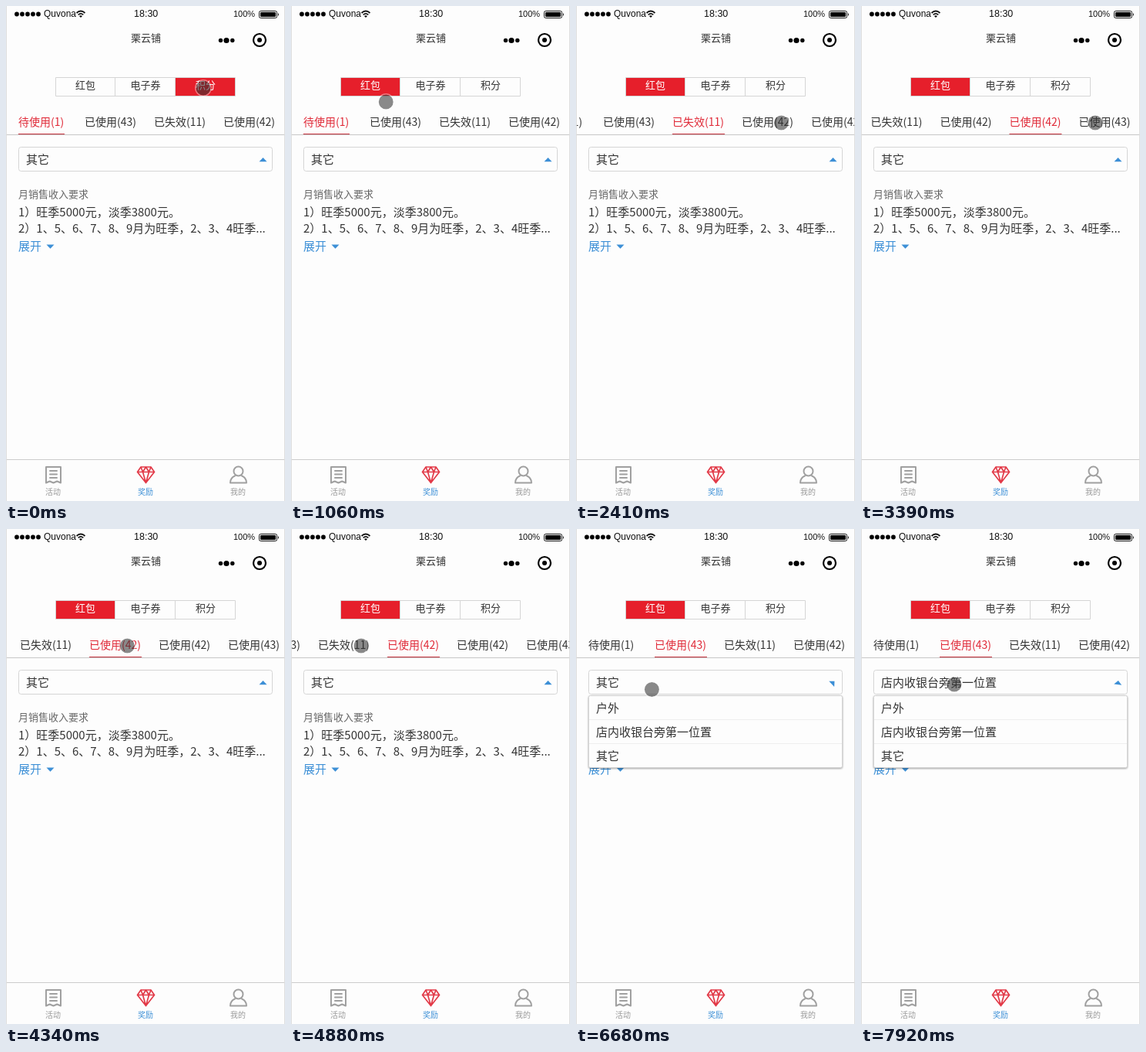
Animation, 362 px wide and 640 px high, one loop 8 s. Source, as an HTML page:

```html
<!DOCTYPE html>
<html lang="zh-CN">
<head>
<meta charset="utf-8">
<title>奖励</title>
<style>
  html, body { margin: 0; width: 100%; height: 100%; overflow: hidden; background: #fdfdfd; }
  svg { display: block; width: 362px; height: 640px; }
  text { font: 15px "Noto Sans CJK SC", "Noto Sans CJK", sans-serif; fill: #333; }
  .status text { font: 12px "Liberation Sans", Arial, sans-serif; fill: #111; }
  .small text, text.small { font-size: 13px; text-anchor: middle; }
  .tabs text { font-size: 14px; }
  .nav text { font-size: 10px; text-anchor: middle; fill: #999; }
  .line { fill: none; stroke: #d5d5d5; }
  .icon { fill: none; stroke: #a0a0a0; stroke-width: 2; stroke-linejoin: round; stroke-linecap: round; }
  .blue, .nav .blue { fill: #3c8fd6; }
  .panel { fill: #fdfdfd; stroke: #d0d0d0; filter: drop-shadow(0 1px 1px rgba(0, 0, 0, .35)); }
</style>
</head>
<body>
<svg viewBox="0 0 362 640">
  <rect width="362" height="640" fill="#fdfdfd"/>

  <g class="status">
    <g id="signal"></g>
    <text x="49" y="14">Quvona</text>
    <path d="M91.5 9Q97 4 102.5 9M93.7 11.4Q97 8.4 100.3 11.4" fill="none" stroke="#111" stroke-width="1.7"/>
    <path d="M95 13Q97 11.3 99 13L97 15Z"/>
    <text x="166" y="14" style="font-size:12.5px">18:30</text>
    <text x="295" y="14" style="font-size:11px">100%</text>
    <rect x="328.5" y="6.5" width="23" height="9" rx="2" fill="none" stroke="#111"/>
    <rect x="330" y="8" width="20" height="6" rx="1"/>
    <path d="M353 9q2 2 0 4z"/>
  </g>

  <text class="small" x="181.5" y="46">栗云铺</text>
  <circle cx="278.5" cy="44.5" r="2.7"/>
  <circle cx="286" cy="44.5" r="3.6"/>
  <circle cx="293.8" cy="44.5" r="2.7"/>
  <circle cx="329" cy="44" r="8" fill="none" stroke="#000" stroke-width="2.2"/>
  <circle cx="329" cy="44" r="3"/>

  <g class="small">
    <rect id="segment" y="93" width="77" height="23" fill="#e61f2b"/>
    <path class="line" d="M64.5 92.5H297.5V116.5H64.5ZM141.5 92V117M219.5 92V117"/>
    <g id="segments"></g>
  </g>

  <clipPath id="strip"><rect x="1" y="130" width="360" height="40"/></clipPath>
  <path class="line" d="M0 166.5H362" style="stroke:#c8c8c8"/>
  <g class="tabs" clip-path="url(#strip)"><g id="tabs">
    <rect id="underline" y="165" height="1" fill="#c4303c"/>
  </g></g>

  <rect class="line" x="16.5" y="182.5" width="329" height="31" rx="3"/>
  <text id="value" x="26" y="204"></text>
  <path id="arrow" class="blue" d="M-5 2.5H5L0-2.7Z"/>

  <text class="small" x="16" y="248" style="text-anchor:start;fill:#666">月销售收入要求</text>
  <text x="16" y="272">1）旺季5000元，淡季3800元。</text>
  <text x="16" y="293">2）1、5、6、7、8、9月为旺季，2、3、4旺季...</text>
  <text class="blue" x="16" y="316">展开</text>
  <path class="blue" d="M52.5 308.5H62.5L57.5 313.7Z"/>

  <g id="menu">
    <rect class="panel" x="16.5" y="215.5" width="329" height="93" rx="2"/>
    <path class="line" d="M17 246.5H345M17 277.5H345" style="stroke:#eee"/>
  </g>

  <g class="nav">
    <path class="line" d="M0 586.5H362" style="stroke:#ccc"/>
    <path class="icon" d="M52 596H71V616.5L66.3 614.5L61.5 616.5L56.7 614.5L52 616.5ZM57 601H66M57 605.5H66M57 610H66"/>
    <path class="icon" style="stroke:#e23a48;stroke-width:1.7" d="M175 596H188L192.5 602.5L181.5 616.5L170.5 602.5ZM170.5 602.5H192.5M177.5 602.5L181.5 616.5L185.5 602.5M175 596L177.5 602.5L181.5 596L185.5 602.5L188 596"/>
    <circle class="icon" cx="301.5" cy="601.5" r="6"/>
    <path class="icon" d="M297 607.5Q291 610 291 616.5H312Q312 610 306 607.5"/>
    <text x="61" y="632">活动</text>
    <text class="blue" x="181" y="632">奖励</text>
    <text x="301" y="632">我的</text>
  </g>

  <path class="line" d="M.5 0V640M361.5 0V640" style="stroke:#dedede"/>
  <g id="cursor">
    <circle r="9.5" fill="#323232" fill-opacity=".57"/>
    <circle r="10.2" fill="none" stroke="#fff" stroke-opacity=".4" stroke-width="1.5"/>
  </g>
</svg>
<script>
const LOOP = 8000, HOLD = 137, EASE_MS = 300;
const $ = id => document.getElementById(id);
const clamp = (v, lo, hi) => Math.min(hi, Math.max(lo, v));
const mix = (a, b, k) => a + (b - a) * k;
const smooth = k => k * k * (3 - 2 * k);
const easeOut = k => 1 - (1 - k) ** 3;

function add(parent, name, attrs, text = '') {
  const el = document.createElementNS('http://www.w3.org/2000/svg', name);
  for (const key in attrs) el.setAttribute(key, attrs[key]);
  el.textContent = text;
  return parent.appendChild(el);
}

for (let i = 0; i < 5; i++) add($('signal'), 'circle', { cx: 14 + i * 7, cy: 10.5, r: 2.9 });

const segments = ['红包', '电子券', '积分'].map((label, i) =>
  add($('segments'), 'text', { x: 103 + i * 78, y: 107 }, label));

const tabLeft = i => i ? 12 + i * 90 : 16;
const scrollFor = i => clamp(tabLeft(i) - 125, 0, 180);
const tabs = ['待使用(1)', '已使用(43)', '已失效(11)', '已使用(42)', '已使用(42)', '已使用(43)']
  .map((label, i) => add($('tabs'), 'text', { x: tabLeft(i), y: 155 }, label));

const options = ['户外', '店内收银台旁第一位置', '其它'];
options.forEach((label, i) => add($('menu'), 'text', { x: 26, y: 237 + i * 31 }, label));

// The finger: three segments leftwards, the tabs up to the last and back, then the menu.
const taps = [];
const tap = (at, kind, index, x, y) => taps.push({ at, kind, index, x, y });
[0, 390, 850].forEach((at, i) => tap(at, 'segment', 2 - i, 256 - i * 78, 106));
[1450, 2060, 2690, 3180, 3600, 3890, 4330, 4920, 5410].forEach((at, i) => {
  const index = 5 - Math.abs(4 - i), previous = i ? taps.at(-1).index : 0;
  tap(at, 'tab', index, Math.min(320, tabLeft(index) + 56 - scrollFor(previous)), 151);
});
tap(6610, 'menu', 1, 97, 204);
tap(7230, 'menu', 0, 121, 262);
tap(7910, 'menu', 1, 121, 201);

function stateOf(kind, t) {
  const past = taps.filter(p => p.kind === kind && p.at <= t);
  const last = past.at(-1) ?? { at: t, index: 0 };
  return {
    now: last.index,
    before: past.at(-2)?.index ?? 0,
    progress: clamp((t - last.at) / EASE_MS, 0, 1),
    count: past.length
  };
}

function cursorAt(t) {
  const next = taps.findIndex(p => p.at > t);
  const from = taps.at(next < 0 ? -1 : next - 1), to = next < 0 ? from : taps[next];
  const travel = (to.at - from.at) * 0.85 || 1;
  const k = smooth(clamp((t - from.at) / travel, 0, 1));
  return [mix(from.x, to.x, k), mix(from.y, to.y, k)];
}

function draw(t) {
  const segment = stateOf('segment', t).now;
  $('segment').setAttribute('x', 65 + segment * 78 - (segment > 0));
  segments.forEach((el, i) => el.style.fill = i === segment ? '#fff' : '');

  const tab = stateOf('tab', t);
  const scroll = mix(scrollFor(tab.before), scrollFor(tab.now), easeOut(tab.progress));
  $('tabs').setAttribute('transform', `translate(${-scroll})`);
  tabs.forEach((el, i) => el.style.fill = i === tab.now ? '#e02a38' : '');
  $('underline').setAttribute('x', tabLeft(tab.now));
  $('underline').setAttribute('width', tab.now ? 68 : 60);

  const menu = stateOf('menu', t);
  const angle = 180 * mix(menu.before, menu.now, menu.progress);
  $('menu').style.display = menu.now ? '' : 'none';
  $('arrow').setAttribute('transform', `translate(333.5 198.7) rotate(${angle})`);
  $('value').textContent = options[menu.count < 2 ? 2 : 1];

  $('cursor').setAttribute('transform', `translate(${cursorAt(t)})`);
}

// The screen refreshes in even steps rather than continuously.
const heldTime = t => Math.max(0, Math.floor((t - 80) / HOLD) * HOLD + 112);

const start = performance.now();
function tick() {
  draw(heldTime((performance.now() - start) % LOOP));
  requestAnimationFrame(tick);
}
tick();
</script>
</body>
</html>
```
